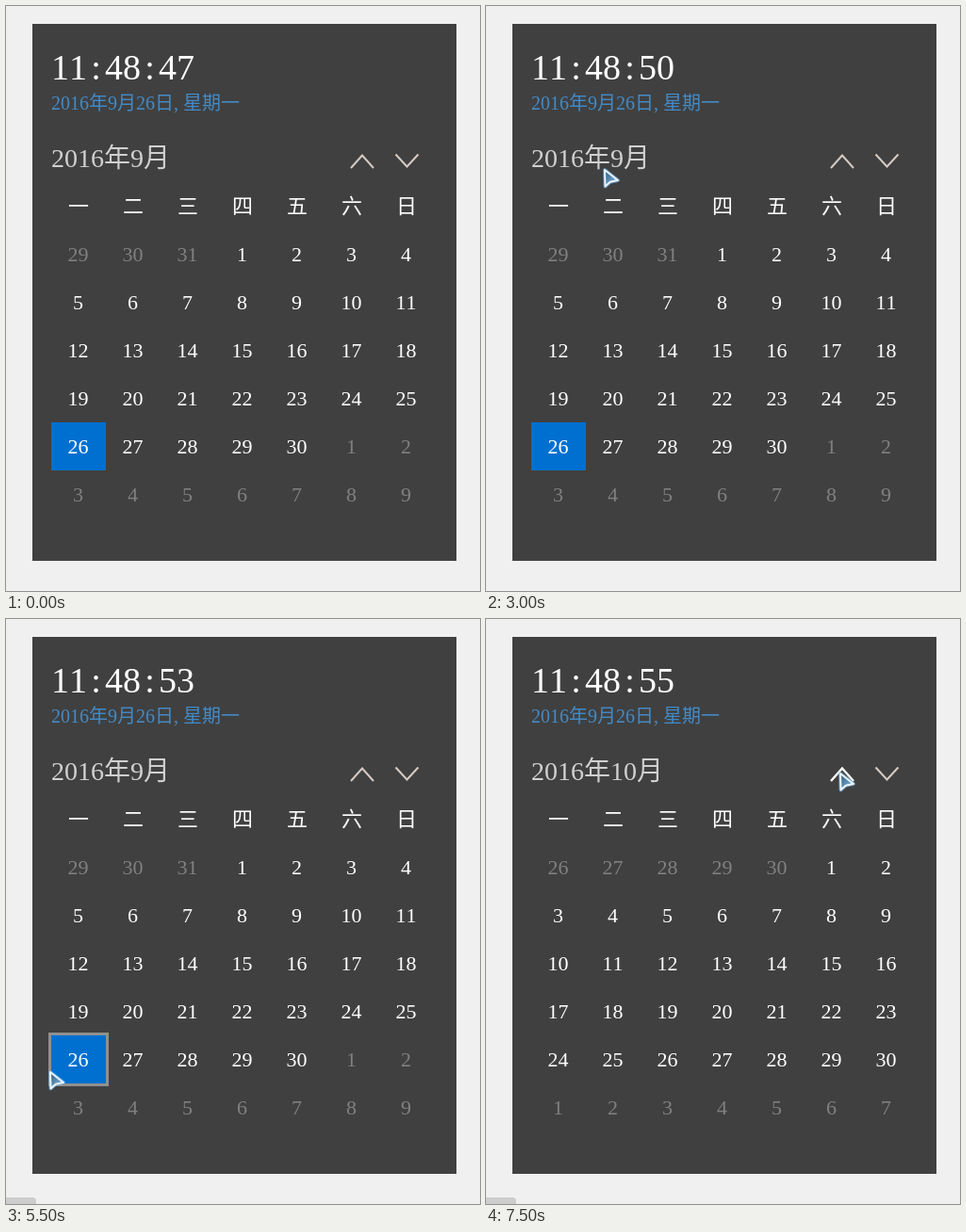
These frames come from a looping animation (503x621 px, 8 s). An HTML page:

```html
<!DOCTYPE html>
<html lang="zh-CN">
<meta charset="utf-8">
<title>Calendar</title>
<style>
  html, body { margin: 0; width: 100%; height: 100%; overflow: hidden; background: #f0f0f0; }
  svg { display: block; }
  text { font-family: "Liberation Serif", "Noto Sans CJK SC", "Noto Sans CJK", serif; font-weight: 300; font-kerning: none; fill: #fff; white-space: pre; }
  .mid { font-size: 22px; text-anchor: middle; }
  .off { fill: #808080; }
  .arrow { fill: none; stroke: #d6cbc4; stroke-width: 2; }
  .arrow.hot { stroke: #fff; stroke-width: 2.4; }
</style>
<svg id="stage" width="503" height="621" viewBox="0 0 503 621">
  <defs>
    <linearGradient id="blue" x2="1" y2="1">
      <stop offset="0" stop-color="#2f5878"/>
      <stop offset="1" stop-color="#8cc6f2"/>
    </linearGradient>
    <path id="pointer" d="M2 2L2.500 19.500L7.800 14.800L16 13Z"/>
  </defs>
  <rect x="28" y="19" width="450" height="570" fill="#404040"/>
  <path id="tab" d="M0 614H28Q32 614 32 618V621H0Z" fill="#cdcdcd"/>
  <text id="clock" x="48" y="78" font-size="38"></text>
  <text id="date" x="48" y="110" font-size="20">2016年9月26日,<tspan dx=".25em">星期一</tspan></text>
  <text id="title" x="48" y="171" font-size="28" style="fill:#d0d0d0"></text>
  <path id="up" class="arrow" d="M366 172L378 158.500L390 172"/>
  <path id="down" class="arrow" d="M413.500 157.500L425.500 170.500L437.500 157.500"/>
  <rect id="today" x="48" y="442" width="58" height="51" fill="#0070d0"/>
  <g id="grid"></g>
  <rect id="ring" width="61" height="54" fill="none" stroke="#909090" stroke-width="3"/>
  <g id="cursor" stroke-linejoin="round">
    <use href="#pointer" fill="none" stroke="#6fb0e4" stroke-opacity=".6" stroke-width="4"/>
    <use href="#pointer" fill="url(#blue)" stroke="#eaf5ff" stroke-width="2"/>
  </g>
</svg>
<script>
const $ = id => document.getElementById(id);
const STEP = 500;
const MONTH_DAYS = 30;

// Pointer position and what it highlights (a grid cell index or an element) per step
const steps = [
  null, [22, 0], [124, 184], [203, 184],
  [252, 69], [176, 227], [124, 172], [130, 98, 'date'],
  [134, 253, 1], [300, 289, 4], [410, 379, 17], [45, 479, 28],
  [62, 478, 28], [429, 167, 'down'], [419, 160, 'down'], [374, 162, 'up']
];

const label = (text, x, y, cls = '') => `<text class="mid ${cls}" x="${x}" y="${y}">${text}</text>`;
const colX = i => 77 + i % 7 * 58;
const rowY = i => 271 + Math.floor(i / 7) * 51;

function drawMonth(month) {
  const first = new Date(2016, month - 1, 1);
  const lead = (first.getDay() + 6) % 7;
  let html = [...'一二三四五六日'].map((d, i) => label(d, colX(i), 220)).join('');
  for (let i = 0; i < 42; i++) {
    const n = i - lead;
    const inside = n >= 0 && n < MONTH_DAYS;
    const day = n < 0 ? new Date(2016, month - 1, n + 1).getDate() : n % MONTH_DAYS + 1;
    html += label(day, colX(i) - 0.5, rowY(i), inside ? '' : 'off');
  }
  $('grid').innerHTML = html;
  $('title').textContent = `2016年${month}月`;
  $('today').style.display = month === 9 ? '' : 'none';
}

function drawClock(second) {
  const spaced = text => `<tspan dx=".111em">${text}</tspan>`;
  $('clock').innerHTML = '11' + [':', 48, ':', second].map(spaced).join('');
}

function draw(n) {
  const [x, y, hover] = steps[n] || [-50, -50];
  drawMonth(n < 15 ? 9 : 10);
  drawClock(n < 14 ? 47 + Math.floor((n + 1) / 2) : 55);
  $('tab').style.display = n < 7 ? 'none' : '';
  $('date').style.fill = hover === 'date' ? '#a6a6a6' : '#438ac6';
  for (const id of ['up', 'down']) $(id).classList.toggle('hot', hover === id);
  const ring = $('ring'), onCell = typeof hover === 'number';
  ring.style.display = onCell ? '' : 'none';
  if (onCell) {
    ring.setAttribute('x', colX(hover) - 30.5);
    ring.setAttribute('y', rowY(hover) - 34.5);
  }
  $('cursor').setAttribute('transform', `translate(${x} ${y})`);
}

let shown = -1;
const start = performance.now();
function tick() {
  const n = Math.floor((performance.now() - start) / STEP) % steps.length;
  if (n !== shown) draw(shown = n);
  requestAnimationFrame(tick);
}
tick();
</script>
</html>
```
